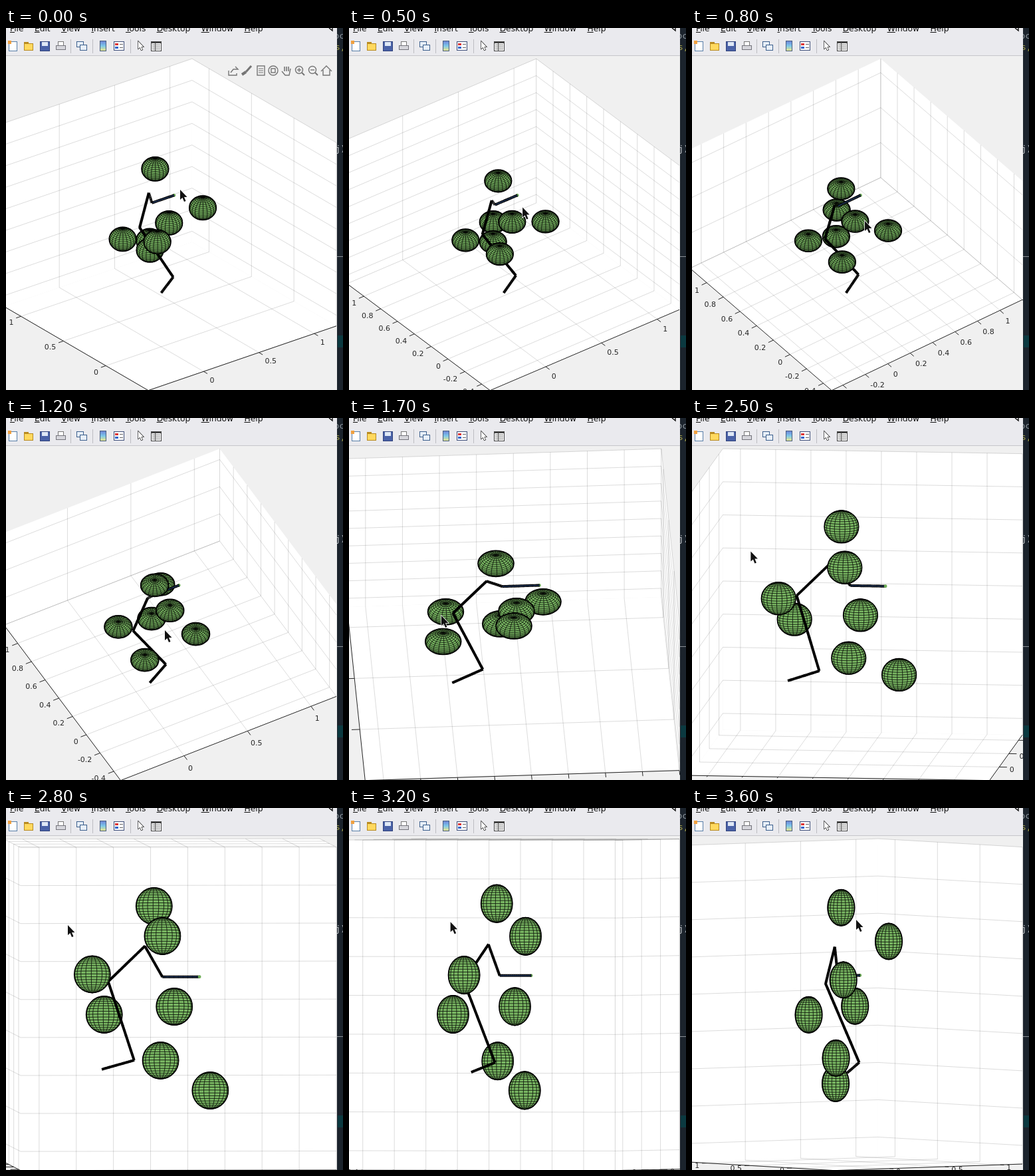
Recreate the animation shown at these times as an HTML page with a canvas. Size 507 px wide and 544 px high, loop 3.7 s.

```html
<!DOCTYPE html>
<html>
<head>
<meta charset="utf-8">
<style>
html, body { margin: 0; width: 507px; height: 544px; overflow: hidden; background: #f0f0f0; }
canvas { display: block; }
</style>
</head>
<body>
<canvas id="stage" width="507" height="544"></canvas>
<script>
const g = document.getElementById('stage').getContext('2d');
const SANS = '"DejaVu Sans", sans-serif', MONO = '"DejaVu Sans Mono", monospace';
const MIN = -.5, MAX = 1.2, RANGE = MAX - MIN, HALF = RANGE / 2, MID = MIN + HALF;
const RADIUS = .097;

// drag poses: tick (100 ms), azimuth, elevation, pointer x, pointer y
const POSES = [
  [1, -37.5, 30, 262, 243],
  [8, -36.6, 52, 260, 290],
  [12, -28.4, 62.4, 239, 319],
  [17, -3.3, 49.5, 139, 297],
  [21, 8.1, 34, 86, 254],
  [28, 3, -1.5, 93, 176],
  [36, -37.5, 1.9, 247, 168]
];

const centred = p => p.map(v => v - MID);
const BALLS = [
  [.26, .41, .87], [.33, -.06, .7], [-.05, -.02, .5], [.37, .39, .34],
  [-.01, .44, .3], [.29, .51, .06], [.54, .84, -.09]
].map(centred);
const ARM = [
  [0, 0, 0], [.17, .08, .05], [.02, .28, .47], [.21, .42, .66], [.3, .5, .5], [.5, .5, .5]
].map(centred);

const rad = a => a * Math.PI / 180;
const lerp = (a, b, f) => a.map((v, i) => v + (b[i] - v) * f);
// places the values of a map of axis -> value into a 3D point
const vec = parts => [parts[0] || 0, parts[1] || 0, parts[2] || 0];

function slope(i, n) {
  return (POSES[i + 1][n] - POSES[i][n]) / (POSES[i + 1][0] - POSES[i][0]);
}
function tangent(i, n) {
  if (i === 0 || i === POSES.length - 1) return slope(i ? i - 1 : 0, n);
  const a = slope(i - 1, n), b = slope(i, n);
  return a * b > 0 ? 2 * a * b / (a + b) : 0;
}
// monotone cubic through the poses
function value(tick, n) {
  const t = Math.max(tick, POSES[0][0]);
  let i = 0;
  while (i < POSES.length - 2 && t >= POSES[i + 1][0]) i++;
  const a = POSES[i], b = POSES[i + 1], d = b[0] - a[0], f = (t - a[0]) / d;
  return a[n] * (1 + 2 * f) * (1 - f) ** 2 + b[n] * f * f * (3 - 2 * f)
    + d * f * (1 - f) * (tangent(i, n) * (1 - f) - tangent(i + 1, n) * f);
}

// orthographic view, stretched so that the box fills the axes area
function camera(az, el) {
  const c = Math.cos(az), s = Math.sin(az), ce = Math.cos(el), se = Math.sin(el);
  const wide = Math.abs(c) + Math.abs(s), tall = wide * Math.abs(se) + ce;
  const kx = 500 / wide / RANGE, ky = 498.5 / tall / RANGE;
  return {
    c, s, se, kx, ky,
    at: ([x, y, z]) => [247 + kx * (c * x + s * y), 295.4 - ky * (se * (c * y - s * x) + ce * z)],
    depth: ([x, y, z]) => ce * (s * x - c * y) + se * z
  };
}

function rect(color, x, y, w, h) { g.fillStyle = color; g.fillRect(x, y, w, h); }
function box(border, fill, x, y, w, h) {
  rect(border, x, y, w, h);
  rect(fill, x + 1, y + 1, w - 2, h - 2);
}
function path(points, close) {
  g.beginPath();
  points.forEach(p => g.lineTo(p[0], p[1]));
  if (close) g.closePath();
}
function line(color, width, ...points) {
  path(points);
  g.strokeStyle = color;
  g.lineWidth = width;
  g.stroke();
}
function text(str, x, y, font, color) {
  g.font = font;
  g.fillStyle = color;
  g.fillText(str, x, y);
}

function ticks(step) {
  const list = [];
  for (let v = Math.ceil(MIN / step) * step; v < MAX + .01; v += step) list.push(v);
  return list;
}

function drawAxes(cam) {
  const back = [cam.s > 0 ? -HALF : HALF, HALF, cam.se > 0 ? -HALF : HALF];
  const origin = cam.at([0, 0, 0]);
  const span = [0, 1, 2].map(a => cam.at(vec({ [a]: RANGE })).map((v, i) => v - origin[i]));
  const fine = [
    Math.abs(span[0][0]) > 400 || Math.abs(span[0][1]) > 130,
    Math.hypot(...span[1]) > 265,
    Math.abs(span[2][1]) > 200
  ];
  const marks = fine.map(f => ticks(f ? .2 : .5));
  const planes = [[0, 1, 2], [0, 2, 1], [1, 2, 0]];

  for (const [a, b, k] of planes) {
    path([[-1, -1], [1, -1], [1, 1], [-1, 1]].map(([i, j]) =>
      cam.at(vec({ [a]: i * HALF, [b]: j * HALF, [k]: back[k] }))), true);
    g.fillStyle = '#fff';
    g.fill();
  }
  for (const [a, b, k] of planes)
    for (const [m, n] of [[a, b], [b, a]])
      for (const v of marks[m])
        line('rgba(38,38,38,.16)', 1,
          ...[-HALF, HALF].map(e => cam.at(vec({ [m]: v - MID, [n]: e, [k]: back[k] }))));

  // both floor rulers start at the lowest corner
  const low = [cam.se * cam.s > 0 ? HALF : -HALF, cam.se > 0 ? -HALF : HALF];
  g.textAlign = 'center';
  g.textBaseline = 'middle';
  g.font = '11px ' + SANS;
  for (const a of [0, 1]) {
    const b = 1 - a, len = Math.hypot(...span[b]), dash = len * .026;
    const [dx, dy] = span[b].map(v => v / len * Math.sign(low[b]));
    const spot = v => cam.at(vec({ [a]: v, [b]: low[b], 2: -HALF }));
    line('#262626', 1, spot(-HALF), spot(HALF));
    for (const v of marks[a]) {
      const [x, y] = spot(v - MID), label = String(+v.toFixed(1) || 0);
      const half = g.measureText(label).width / 2;
      line('#262626', 1, [x, y], [x + dx * dash, y + dy * dash]);
      g.fillStyle = '#262626';
      g.fillText(label, x + dx * (dash + 4) + half * Math.max(-1, Math.min(1, dx * 1.2)), y + 4 + dy * 19);
    }
  }
  g.textAlign = 'left';
  g.textBaseline = 'alphabetic';
}

function drawBall(cam, centre) {
  const N = 20, rim = new Path2D(), mesh = new Path2D();
  rim.ellipse(...cam.at(centre), RADIUS * cam.kx, RADIUS * cam.ky, 0, 0, 7);
  const normal = (i, j) => {
    const lon = i * 2 * Math.PI / N, lat = (j / N - .5) * Math.PI;
    return [Math.cos(lat) * Math.cos(lon), Math.cos(lat) * Math.sin(lon), Math.sin(lat)];
  };
  const spot = n => cam.at(n.map((v, i) => centre[i] + v * RADIUS));
  const edge = (m, n) => {
    if (cam.depth(m) + cam.depth(n) < 0) return;
    mesh.moveTo(...spot(m));
    mesh.lineTo(...spot(n));
  };
  for (let i = 0; i < N; i++)
    for (let j = 0; j < N; j++) {
      edge(normal(i, j), normal(i + 1, j));
      edge(normal(i, j), normal(i, j + 1));
    }
  g.fillStyle = '#7ab863';
  g.fill(rim);
  g.strokeStyle = '#000';
  g.lineWidth = .75;
  g.stroke(mesh);
  g.lineWidth = 1.5;
  g.stroke(rim);
}

// balls and short pieces of the arm, painted from back to front
function drawScene(cam) {
  const PARTS = 16, items = [];
  const add = (point, draw) => items.push({ depth: cam.depth(point), draw });
  BALLS.forEach(b => add(b, () => drawBall(cam, b)));
  ARM.slice(1).forEach((end, i) => {
    const last = i === ARM.length - 2;
    for (let j = 0; j < PARTS; j++) {
      const a = lerp(ARM[i], end, j / PARTS), b = lerp(ARM[i], end, (j + 1.1) / PARTS);
      add(a, () => {
        line('#000', 4, cam.at(a), cam.at(b));
        if (last) line('#26406e', 1.2, cam.at(a), cam.at(b));
      });
    }
  });
  const tip = ARM[ARM.length - 1];
  add(tip, () => {
    g.beginPath();
    g.arc(...cam.at(tip), 2.4, 0, 7);
    g.fillStyle = '#6fae58';
    g.fill();
  });
  items.sort((a, b) => a.depth - b.depth).forEach(i => i.draw());
}

function drawPointer(x, y, scale, fill, border) {
  g.save();
  g.translate(x, y);
  g.scale(scale, scale);
  path([[0, 0], [0, 15], [3.5, 12], [6, 18], [8.5, 17], [6, 11], [10.5, 11]], true);
  g.lineWidth = 1.5;
  g.strokeStyle = border;
  g.stroke();
  g.fillStyle = fill;
  g.fill();
  g.restore();
}

function drawBars() {
  rect('#eaeaee', 0, 0, 498, 42);
  rect('#c6c6ca', 0, 41, 498, 1);
  let x = 6;
  for (const name of ['File', 'Edit', 'View', 'Insert', 'Tools', 'Desktop', 'Window', 'Help']) {
    text(name, x, 5, '12.3px ' + SANS, '#111');
    rect('#111', x, 6, g.measureText(name[0]).width, 1);
    x += g.measureText(name).width + 16.3;
  }
  line('#111', 1.4, [486, 0], [491, 4], [491, 0]);
  for (const s of [97, 130, 187]) rect('#bdbdc2', s, 17, 1, 21);

  // new, open, save, print
  box('#5a7fa8', '#fff', 4, 20, 13, 15);
  rect('#f0a040', 3, 19, 5, 5);
  rect('#b88a20', 27, 21, 7, 4);
  box('#b88a20', '#ffd95e', 27, 23, 14, 11);
  box('#30427c', '#4a62a8', 51, 20, 15, 15);
  rect('#dfe8f6', 54, 21, 9, 6);
  box('#777', '#fff', 78, 20, 9, 8);
  box('#74747c', '#d6d6dc', 75, 26, 15, 7);

  // link, colour scale, legend, arrow, inspector
  for (const d of [0, 5]) box('#3c5f8c', '#e8f0fa', 106 + d, 20 + d, 11, 9);
  const scale = g.createLinearGradient(0, 20, 0, 34);
  ['#6e86d8', '#7cc8ea', '#e9e58a'].forEach((c, i) => scale.addColorStop(i / 2, c));
  box('#4a6080', scale, 141, 19, 10, 16);
  box('#40507a', '#fff', 162, 20, 16, 14);
  ['#d33', '#36c'].forEach((c, i) => {
    rect(c, 164, 23 + 5 * i, 5, 3);
    rect('#666', 171, 24 + 5 * i, 5, 1);
  });
  drawPointer(199, 20, .75, '#fff', '#000');
  box('#444', '#fff', 218, 20, 16, 15);
  rect('#444', 218, 20, 16, 3);
  rect('#444', 224, 20, 1, 15);
  for (let y = 25; y < 33; y += 3) rect('#777', 220, y, 12, 1);
}

// small plot tools, one every 20 px
function drawTools() {
  const draw = [
    () => { line(C, 1.4, [-7, 0], [-7, 7], [5, 7], [5, 4]); line(C, 1.4, [-4, 3], [0, -2], [7, -2], [3, -6]); },
    () => { line(C, 3, [7, -7], [-1, 2]); line(C, 4, [-1, 2], [-7, 6]); },
    () => { g.strokeRect(-4, -7, 11, 14); for (const y of [-3, 0, 3]) line(C, 1, [-2, y], [5, y]); },
    () => { ring(0, 0, 7); g.strokeRect(-3, -3, 6, 6); },
    () => { for (let x = -3; x < 6; x += 3) line(C, 1.6, [x, 1], [x, -6]); line(C, 1.4, [-7, 1], [-2, 7], [4, 7], [6, -3]); },
    () => { zoom(); line(C, 1.4, [-1, -4], [-1, 2]); },
    () => zoom(),
    () => { line(C, 1.4, [-8, 1], [0, -7], [8, 1]); line(C, 1.4, [-5, -1], [-5, 7], [5, 7], [5, -1]); }
  ];
  const C = '#757575';
  const ring = (x, y, r) => { g.beginPath(); g.arc(x, y, r, 0, 7); g.stroke(); };
  const zoom = () => { ring(-1, -1, 5.5); line(C, 2, [3, 3], [7, 7]); line(C, 1.4, [-4, -1], [2, -1]); };
  draw.forEach((tool, i) => {
    g.save();
    g.translate(342 + 20 * i, 64);
    g.strokeStyle = C;
    g.lineWidth = 1.4;
    tool();
    g.restore();
  });
}

function drawEditor() {
  rect('#1b232c', 498, 0, 9, 544);
  rect('#0b3940', 499, 462, 8, 18);
  rect('#8a9096', 498, 343, 9, 1);
  const font = '13px ' + MONO;
  text('oc', 493.5, 16, font, '#8d959c');
  text('s,', 495, 33, font, '#a3a04a');
  text('j)', 495.5, 186, font, '#c4c8cc');
}

function drawWindow(tick) {
  g.save();
  g.beginPath();
  g.rect(0, 0, 498, 544);
  g.clip();
  rect('#f0f0f0', 0, 0, 498, 544);
  const cam = camera(rad(value(tick, 1)), rad(value(tick, 2)));
  drawAxes(cam);
  drawScene(cam);
  drawBars();
  if (tick < 2) drawTools();
  drawPointer(value(tick, 3), value(tick, 4), 1, '#111', '#fff');
  g.restore();
}

let shown = -1;
function frame(now) {
  const tick = Math.floor(now % 3700 / 100);
  if (tick !== shown) {
    shown = tick;
    drawEditor();
    drawWindow(tick);
  }
  requestAnimationFrame(frame);
}
requestAnimationFrame(frame);
</script>
</body>
</html>
```
